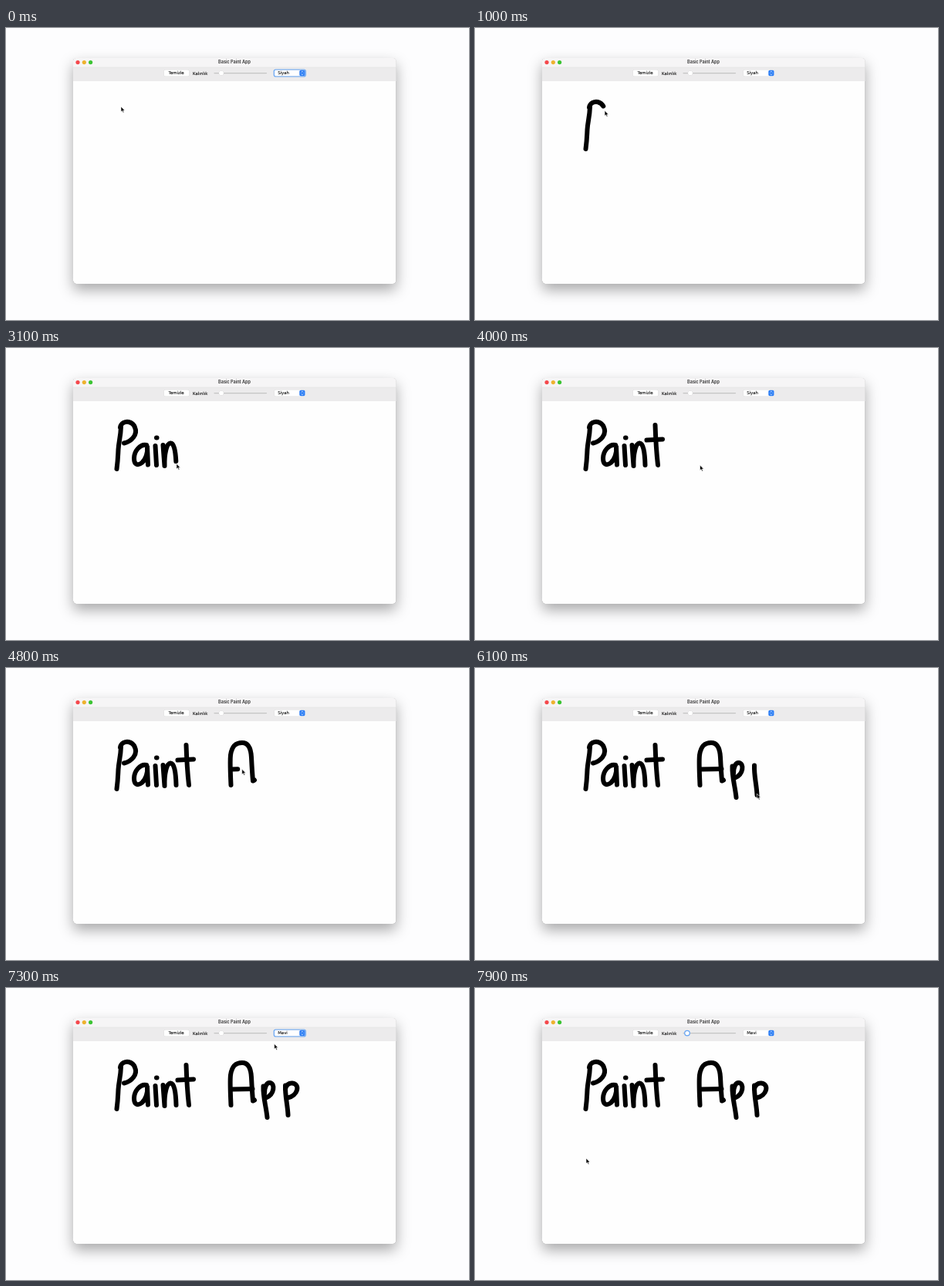
Write an HTML page that moves like this. It is 600x379 px and loops after 8000 ms.

```html
<!DOCTYPE html>
<html lang="tr">
<head>
<meta charset="utf-8">
<title>Basic Paint App</title>
<style>
  html, body { margin: 0; height: 100%; overflow: hidden; background: #fdfdfe; }
  svg { display: block; width: 100vw; height: 100vh; }
  text { font: 5.4px "DejaVu Sans", sans-serif; fill: #111; stroke: #111; stroke-width: .1; }
  .title { font: 700 5.5px Inter, sans-serif; fill: #444; stroke: none; text-anchor: middle; }
  .window { filter: drop-shadow(0 0 .6px #0008) drop-shadow(0 8px 9px #0005); }
  .control { fill: #fff; filter: drop-shadow(0 .4px .4px #0004); }
  .popup { fill: #fff; filter: drop-shadow(0 1px 1.5px #0007); }
  .ring { fill: none; stroke: #64a4f4; stroke-width: 1.2; }
  #ink { fill: none; stroke: #000; stroke-width: 6; stroke-linecap: round; stroke-linejoin: round; }
</style>
</head>
<body>
<svg viewBox="0 0 600 379">
  <rect class="window" x="87" y="39" width="418.5" height="293" rx="4.5" fill="#fefefe"/>
  <path d="M87 51V43.5a4.5 4.5 0 0 1 4.5-4.5H501a4.5 4.5 0 0 1 4.5 4.5V51z" fill="#f6f5f6"/>
  <path d="M87 51H505.5V69H87z" fill="#ecebec"/>
  <path d="M87 51H505.5" stroke="#dedede" stroke-width=".5"/>
  <circle cx="93" cy="44.6" r="2.6" fill="#f5484c"/>
  <circle cx="101.3" cy="44.6" r="2.6" fill="#eeb22e"/>
  <circle cx="109.6" cy="44.6" r="2.6" fill="#3cc433"/>
  <text class="title" x="296" y="46.4">Basic Paint App</text>

  <rect class="control" x="204.5" y="54.2" width="33" height="8.6" rx="2"/>
  <text x="210.6" y="60.3">Temizle</text>
  <text x="242" y="60.5">Kalınlık</text>
  <path d="M270 58.6H337.5" stroke="#c4c4c4" stroke-width="1.2" stroke-linecap="round"/>
  <circle id="knob" class="control" cy="58.6" r="3"/>
  <circle id="knobRing" class="ring" cx="275" cy="58.6" r="3.3"/>

  <rect class="control" x="347.5" y="54.2" width="40.5" height="8.6" rx="2"/>
  <rect id="comboRing" class="ring" x="347.3" y="54" width="41" height="9" rx="2.2"/>
  <rect x="380.3" y="54.8" width="7.2" height="7.4" rx="1.7" fill="#2b7df4"/>
  <path d="M382.5 57.6l1.4-1.4 1.4 1.4M382.5 59.4l1.4 1.4 1.4-1.4" fill="none" stroke="#fff" stroke-width=".7"/>
  <text id="color" x="352.2" y="60.3"></text>

  <g id="ink"></g>
  <rect id="popup" class="popup" x="343" y="53.3" width="42.7" height="40.5" rx="1"/>
  <path id="cursor" d="M0 0V6.8L1.6 5.4 2.7 8 3.9 7.5 2.8 5H4.9z" fill="#000" stroke="#fff" stroke-width=".6"/>
</svg>
<script>
const LOOP = 8000, STEP = 100;
const INK_LAG = 40; // ink trails the pointer slightly

// Pointer moves: start ms, end ms, path, and whether the path leaves ink
const moves = [
  [150, 500, 'M149 102C148.500 116 146 122 145.500 132S145 146 143.500 157', true],
  [810, 1150, 'M148 103C149 97 155 95 159 96S166 100 167 103C171 112 163 121 153 123.500', true],
  [1460, 2110, 'M182 126C174 124 166 134 166 143S171 153 176 149S184 136 183 128L184 151.500', true],
  [2230, 2380, 'M193.500 127L195 152', true],
  [2480, 2500, 'M195 116.500h.5', true],
  [2700, 3080, 'M203.500 126L205.500 153C205 138 208 124 213 123.500S220 135 220.500 152', true],
  [3260, 3540, 'M233.500 100Q234.500 130 237 152', true],
  [3680, 3850, 'M222.500 119.500L243 118.500', true],
  [4000, 4450, 'M291.500 152C291 140 290 122 291 113C293 99 300 97 306 97C315 97 317.500 106 318 116S319 136 320 146.500L322 145.500', true],
  [4700, 4900, 'M292 131.500L319.500 131', true],
  [5120, 5360, 'M333.500 127.500C333 142 337 153 338.500 168', true],
  [5500, 5760, 'M335 137C335 128 338 122.500 342 123C349 124 348 138 337 142.500', true],
  [5880, 6060, 'M362 126.500C361.500 140 365 152 365.500 165', true],
  [6340, 6620, 'M362 131C363 126 367 123 371 123.500C382 125 378 140 365 142.500', true],
  [6800, 6950, 'M361 61h.1'],
  [7150, 7250, 'M361 75h.1'],
  [7450, 7550, 'M275 58.500h.1'],
  [7880, 8000, 'M144 221h.1']
];

const $ = id => document.getElementById(id);
const clamp = v => Math.min(1, Math.max(0, v));
const ease = v => v * v * (3 - 2 * v);
const show = (el, on) => el.setAttribute('visibility', on ? 'visible' : 'hidden');

const strokes = moves.map(([start, end, d, inked]) => {
  const path = document.createElementNS('http://www.w3.org/2000/svg', 'path');
  path.setAttribute('d', d);
  $('ink').append(path);
  const length = path.getTotalLength();
  path.setAttribute('pathLength', 1);
  return { start, end, inked, path, at: p => path.getPointAtLength(p * length) };
});

function pointer(t) {
  const i = strokes.findIndex(s => t < s.end);
  const next = strokes[i], prev = strokes[i - 1];
  if (t >= next.start || !prev) return next.at(clamp((t - next.start) / (next.end - next.start)));
  const a = prev.at(1), b = next.at(0);
  const p = ease((t - prev.end) / (next.start - prev.end));
  return { x: a.x + (b.x - a.x) * p, y: a.y + (b.y - a.y) * p };
}

function draw(t) {
  for (const s of strokes) {
    const p = (t - INK_LAG - s.start) / (s.end - s.start);
    show(s.path, s.inked && p >= 0);
    s.path.setAttribute('stroke-dasharray', `${clamp(p)} 2`);
  }
  const { x, y } = pointer(t);
  $('cursor').setAttribute('transform', `translate(${x} ${y})`);

  const onSlider = t >= 7500;
  $('knob').setAttribute('cx', onSlider ? 275 : 279);
  show($('knobRing'), onSlider);
  show($('comboRing'), t < 200 || (t >= 6900 && !onSlider));
  show($('popup'), t >= 6900 && t < 7300);
  $('color').textContent = t < 7300 ? 'Siyah' : 'Mavi';
}

function tick() {
  const t = performance.now() % LOOP;
  draw(Math.floor(t / STEP) * STEP);
  requestAnimationFrame(tick);
}
tick();
</script>
</body>
</html>
```
